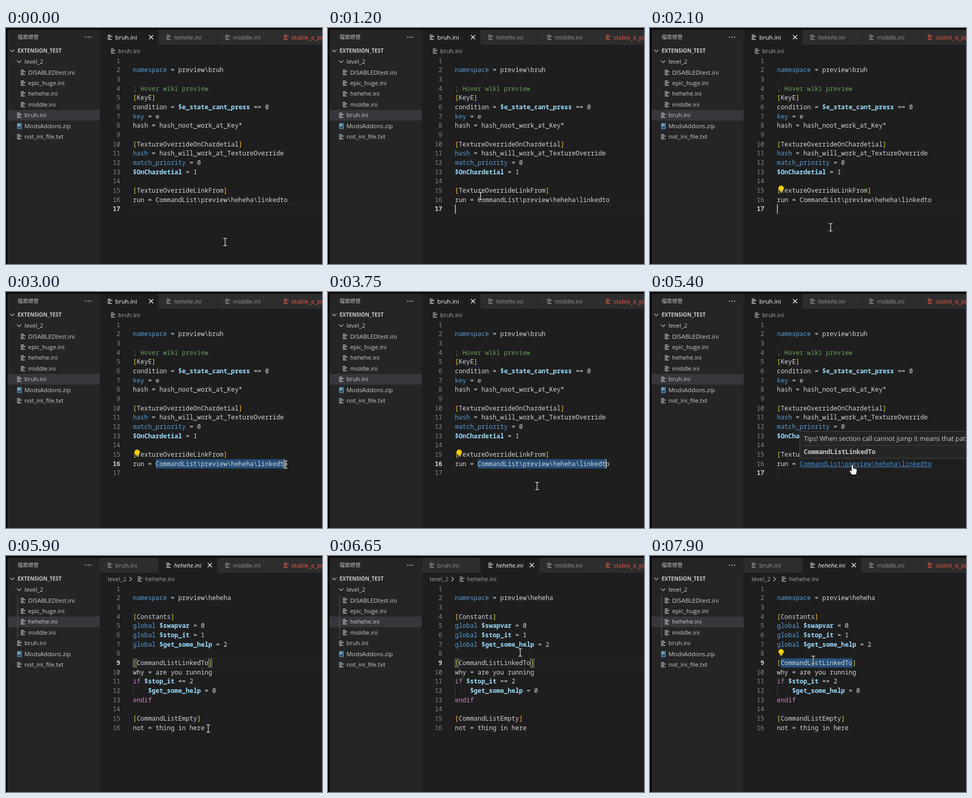
An HTML page with a canvas that plays this animation: 600 px wide and 450 px high, repeating every 8 s.

```html
<!DOCTYPE html>
<html lang="en">
<head>
<meta charset="utf-8">
<title>Section jump in an ini editor</title>
<style>
html, body { margin: 0; width: 100%; height: 100%; overflow: hidden; background: #1e1e1e; }
canvas { display: block; width: 600px; height: 450px; }
</style>
</head>
<body>
<canvas id="stage"></canvas>
<script>
const LOOP = 8000, W = 600, H = 450;
const CODE_X = 241, CHAR = 7.17, ROW = 17.68, BASE = 66.5;
const MONO = '11.95px "Noto Sans Mono", "DejaVu Sans Mono", monospace';
const SANS = '"Open Sans", "Noto Sans", sans-serif';
const UI = '500 11.4px ' + SANS;
const ITALIC = 'italic ' + UI;

const canvas = document.getElementById('stage');
const ctx = canvas.getContext('2d');
const dpr = window.devicePixelRatio || 1;
canvas.width = W * dpr;
canvas.height = H * dpr;

// @word: key, %word: control word
const BRUH = String.raw`
@namespace = preview\bruh

; Hover wiki preview
[KeyE]
condition = $e_state_cant_press == 0
@key = e
hash = hash_noot_work_at_Key*

[TextureOverrideOnChardetial]
@hash = hash_will_work_at_TextureOverride
@match_priority = 0
$OnChardetial = 1

[TextureOverrideLinkFrom]
run = CommandList\preview\heheha\linkedto
`.split('\n');

const HEHEHE = String.raw`
@namespace = preview\heheha

[Constants]
@global $swapvar = 0
@global $stop_it = 1
@global $get_some_help = 2

[CommandListLinkedTo]
why = are you running
%if $stop_it == 2
    $get_some_help = 0
%endif

[CommandListEmpty]
not = thing in here`.split('\n');

const TOKEN = /^;.*|@\w+|%\w+|\$\w+|[\[\]]|[^@%$\[\]]+/g;
const INK = { ';': '#6a9955', '@': '#569cd6', '%': '#c586c0', '$': '#9cdcfe', '[': '#f0cf35', ']': '#f0cf35' };

// Pointer stops: time, x, y
const STOPS = [
  [550, 416, 408], [950, 300, 306], [1350, 285, 327], [1430, 285, 328],
  [1720, 531, 329], [1900, 450, 436], [2040, 343, 380], [2110, 343, 380],
  [2210, 290, 345], [2400, 285, 329], [2450, 285, 329], [2690, 531, 329],
  [3100, 531, 329], [3250, 555, 330], [3450, 470, 380], [3700, 397, 370],
  [3920, 397, 370], [4150, 384, 329], [6200, 384, 329], [6430, 436, 245],
  [6650, 365, 184], [6820, 300, 178], [7050, 258, 203], [7170, 249, 205],
  [7390, 385, 212], [7640, 310, 198]
];

// Drag selections: line, first column, press, release, cleared
const DRAGS = [
  { line: 16, col: 6, press: 1420, release: 1720, end: 2050 },
  { line: 16, col: 6, press: 2420, release: 2700, end: 3895 },
  { line: 9, col: 1, press: 7180, release: 7400, end: LOOP }
];
const BULBS = [[1850, 2250, 307], [2950, 3895, 307], [7600, LOOP, 184]];
const HOVER = 4100, TIP = 4375, JUMP = 5700;

const baseline = line => BASE + ROW * (line - 1);
const colX = col => CODE_X + CHAR * col;
const within = (t, a, b) => t >= a && t < b;

function rect(x, y, w, h, color) {
  ctx.fillStyle = color;
  ctx.fillRect(x, y, w, h);
}

function text(str, x, y, color, font = UI) {
  ctx.font = font;
  ctx.fillStyle = color;
  ctx.fillText(str, x, y);
}

function line(points, color, width = 1) {
  ctx.strokeStyle = color;
  ctx.lineWidth = width;
  ctx.beginPath();
  points.forEach(([x, y]) => ctx.lineTo(x, y));
  ctx.stroke();
}

function frame(x, y, w, h, color) {
  ctx.strokeStyle = color;
  ctx.lineWidth = 1;
  ctx.strokeRect(x, y, w, h);
}

function fileIcon(x, y, color = '#c5c8c6') {
  [[0, 6], [0, 9], [0, 5], [0, 8]].forEach(([dx, w], i) => rect(x + dx, y - 4.6 + i * 2.7, w, 1.4, color));
}

function chevron(x, y, down) {
  line(down ? [[x - 4, y - 2], [x, y + 2], [x + 4, y - 2]] : [[x - 2, y - 4], [x + 2, y], [x - 2, y + 4]], '#c0c0c0', 1.1);
}

function cross(x, y) {
  line([[x - 4, y - 4], [x + 4, y + 4]], '#e8e8e8', 1.4);
  line([[x - 4, y + 4], [x + 4, y - 4]], '#e8e8e8', 1.4);
}

function pointer(t) {
  const i = STOPS.findIndex(s => s[0] > t);
  if (i === 0) return STOPS[0].slice(1);
  if (i < 0) return STOPS[STOPS.length - 1].slice(1);
  const [t0, x0, y0] = STOPS[i - 1], [t1, x1, y1] = STOPS[i];
  const p = (t - t0) / (t1 - t0), e = p * p * (3 - 2 * p);
  return [x0 + (x1 - x0) * e, y0 + (y1 - y0) * e];
}

function selection(t) {
  const d = DRAGS.find(d => within(t, d.press, d.end));
  if (!d) return null;
  const [x] = pointer(Math.min(t, d.release));
  const last = d.line === 16 ? 41 : 20;
  const to = Math.max(d.col, Math.min(last, Math.round((x - CODE_X) / CHAR)));
  return { ...d, to };
}

function sidebar(jumped) {
  rect(3, 3, 175, H, '#252526');
  text('檔案總管', 22, 21, '#bbbbbb', '10px "Noto Sans CJK TC", "Noto Sans CJK", sans-serif');
  for (let i = 0; i < 3; i++) rect(150.5 + i * 4.5, 16.5, 2, 2, '#c5c5c5');
  chevron(12, 43.5, true);
  text('EXTENSION_TEST', 22, 47.2, '#cccccc', 'bold 10px ' + SANS);
  chevron(25, 64, true);
  text('level_2', 35, 68, '#cccccc');

  const files = ['DISABLEDtest.ini', 'epic_huge.ini', 'hehehe.ini', 'middle.ini', 'bruh.ini', 'ModsAddons.zip', 'not_ini_file.txt'];
  const active = jumped ? 2 : 4;
  files.forEach((name, i) => {
    const y = 84.5 + i * 20.45, x = i < 4 ? 28 : 21;
    if (i === active) rect(3, y - 10, 175, 20.3, '#37373d');
    if (name.endsWith('zip')) {
      rect(x, y - 5.5, 9, 11.5, '#4f7f96');
      rect(x + 2, y - 4, 2, 4, '#b8cbd4');
      rect(x + 2, y + 2, 5, 2, '#263e49');
    } else fileIcon(x, y);
    text(name, x + 14, y + 4, '#cccccc');
  });
  if (jumped) rect(21.5, 74.5, 1, 82, '#585858');
}

function tabs(jumped) {
  rect(178, 3, W, 29, '#252526');
  const list = [['bruh.ini', 178, UI], ['hehehe.ini', 289.5, ITALIC], ['middle.ini', 401.5, UI], ['stable_e_preview.ini', 512.5, UI]];
  const active = jumped ? 1 : 0;
  list.forEach(([name, x, font], i) => {
    const on = i === active, error = i === 3;
    rect(x, 3, 111, 29, on ? '#1e1e1e' : '#2d2d2d');
    fileIcon(x + 15, 17.5, error ? '#e25844' : on ? '#d8d8d8' : '#9a9a9a');
    text(name, x + 29.5, 21.7, error ? '#f05a45' : on ? '#ffffff' : '#969696', font);
    if (on) cross(x + 97.5, 17.5);
  });

  if (jumped) {
    text('level_2', 193, 47.8, '#a9a9a9');
    chevron(236.5, 44, false);
  }
  const x = jumped ? 250 : 199;
  fileIcon(x, 44, '#b5b5b5');
  text(jumped ? 'hehehe.ini' : 'bruh.ini', x + 14, 47.8, '#a9a9a9');
}

function codeLine(src, n) {
  let col = 0;
  for (const tok of src.match(TOKEN) || []) {
    const word = tok.replace(/^[@%]/, '');
    const weight = tok[0] === '$' ? '700 ' : '500 ';
    text(word, colX(col), baseline(n), INK[tok[0]] || '#d4d4d4', weight + MONO);
    col += word.length;
  }
}

function code(t, jumped) {
  const lines = jumped ? HEHEHE : BRUH;
  const sel = selection(t);
  const current = sel ? sel.line : jumped ? 9 : 17;
  const base = baseline(current), top = base - 12.9;

  if (sel) rect(colX(sel.col), top, CHAR * (sel.to - sel.col), ROW, '#264f78');
  else frame(CODE_X + .5, Math.round(top) + .5, W, 17, '#2c2c2c');
  if (jumped) rect(CODE_X, baseline(12) - 12.9, 1, ROW, '#404040');
  if (jumped && !sel) {
    for (const col of [0, 20]) {
      rect(colX(col), top + 1, CHAR, 16, '#1c2b20');
      frame(Math.round(colX(col)) + .5, Math.round(top) + 1.5, 6.5, 15.5, '#888888');
    }
  }

  lines.forEach((src, i) => {
    const n = i + 1;
    ctx.textAlign = 'right';
    text(n, 217, baseline(n), n === current ? '#d0d0d0' : '#858585', (n === current ? '700 ' : '500 ') + MONO);
    ctx.textAlign = 'left';
    codeLine(src, n);
  });

  const since = sel ? sel.release : t >= 3895 ? 3895 : t >= 2050 ? 2050 : 50;
  const lit = Math.floor((t - since) / 500) % 2 === 0;
  if ((sel || !jumped) && (lit || (sel && t < since)))
    rect(sel ? colX(sel.to) - .5 : CODE_X, top, 1.5, ROW, '#c8c8c8');
}

function link() {
  const y = baseline(16), path = 'CommandList\\preview\\heheha\\linkedto';
  rect(colX(6), y - 11, CHAR * 35, 14, '#1e1e1e');
  text(path, colX(6), y, '#4290d8', '500 ' + MONO);
  rect(colX(6), y + 1.3, CHAR * 35, 1, '#4290d8');
}

function tooltip(alpha) {
  ctx.globalAlpha = alpha;
  rect(284, 265, W, 53, '#252526');
  frame(284.5, 265.5, W, 52, '#454545');
  rect(285, 292, W, 1, '#3e3e3f');
  text('Tips! When section call cannot jump it means that path', 292, 284, '#cccccc', '500 12.35px ' + SANS);
  text('CommandListLinkedTo', 292, 309, '#cccccc', '700 ' + MONO);
  ctx.globalAlpha = 1;
}

function bulb(y) {
  ctx.fillStyle = '#ffcc00';
  ctx.beginPath();
  ctx.arc(249, y - 1.5, 5, 0, Math.PI * 2);
  ctx.fill();
  rect(246.5, y + 1, 5, 3, '#ffcc00');
  rect(247, y + 4.5, 4, 2, '#c9b458');
}

function beam(x, y) {
  const shape = (color, w) => {
    line([[x, y - 7], [x, y + 7]], color, w);
    for (const d of [-7, 7]) line([[x - 3.5, y + d], [x + 3.5, y + d]], color, w);
  };
  shape('#111111', 2.6);
  shape('#e6e6e6', 1.3);
}

function hand(x, y) {
  ctx.save();
  ctx.translate(x, y);
  ctx.beginPath();
  ctx.moveTo(-1.7, 1);
  ctx.quadraticCurveTo(0, -1.5, 1.7, 1);
  ctx.lineTo(1.7, 6.5);
  ctx.lineTo(7, 7.6);
  ctx.quadraticCurveTo(9.3, 8.2, 9.2, 10.5);
  ctx.lineTo(8.6, 15);
  ctx.lineTo(7, 19.5);
  ctx.lineTo(-.8, 19.5);
  ctx.lineTo(-5, 13.3);
  ctx.quadraticCurveTo(-5.5, 10.3, -3.3, 11);
  ctx.lineTo(-1.7, 12.4);
  ctx.closePath();
  ctx.fillStyle = '#ffffff';
  ctx.strokeStyle = '#111111';
  ctx.lineWidth = 1;
  ctx.fill();
  ctx.stroke();
  for (const k of [2.2, 4.6, 6.8]) line([[k, 7.5], [k, 10.5]], '#777777', .7);
  ctx.restore();
}

function draw(now) {
  const t = now % LOOP;
  const jumped = t >= JUMP;
  const hovering = within(t, HOVER, JUMP);
  ctx.setTransform(dpr, 0, 0, dpr, 0, 0);
  rect(0, 0, W, H, '#1e1e1e');
  rect(0, 0, W, 3, '#000000');
  rect(0, 0, 3, H, '#050505');
  sidebar(jumped);
  tabs(jumped);
  code(t, jumped);
  for (const [from, to, y] of BULBS) if (within(t, from, to)) bulb(y);
  if (hovering) {
    link();
    if (t > TIP) tooltip(Math.min(1, (t - TIP) / 100));
  }
  (hovering ? hand : beam)(...pointer(t));
  requestAnimationFrame(() => draw(performance.now()));
}

draw(performance.now());
</script>
</body>
</html>
```
